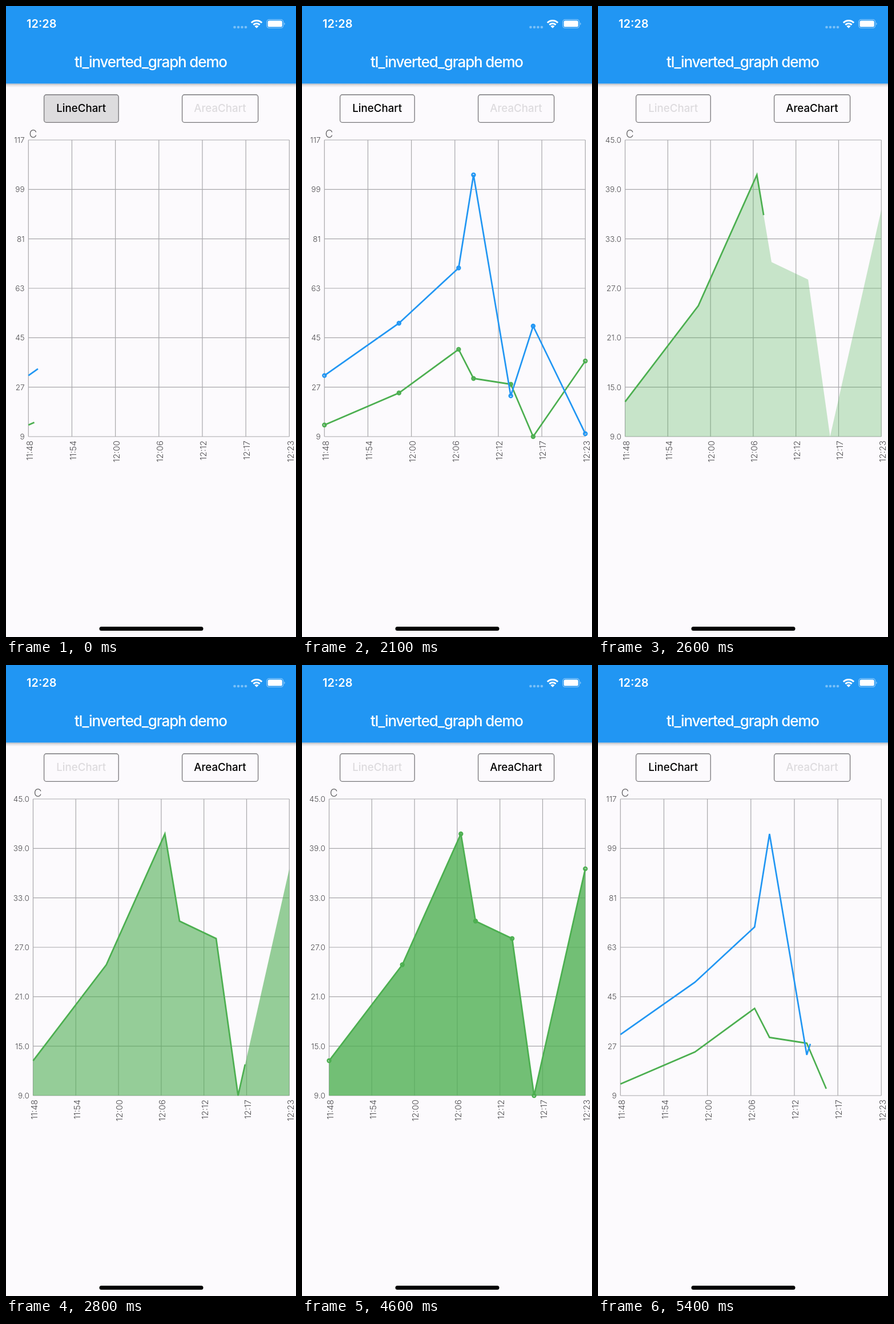
An HTML page for the animation above (5500 ms loop, 508 by 1102 pixels).

```html
<!DOCTYPE html>
<html lang="en">
<head>
<meta charset="utf-8">
<title>Chart demo</title>
<style>
  html, body { margin: 0; width: 100%; height: 100%; overflow: hidden; background: #fcfafd; }
  svg { display: block; width: 100%; height: 100%; font-family: Inter, Roboto, sans-serif; }
  .title { font-size: 26px; font-weight: 500; letter-spacing: -1.15px; fill: #fff; text-anchor: middle; }
  .clock { font-size: 20px; font-weight: 600; fill: #fff; }
  .button rect { stroke: #777679; stroke-width: 1.3; fill: #000; }
  .button text { font-size: 18.7px; font-weight: 500; text-anchor: middle; }
  .grid { fill: none; stroke: #77767a; stroke-opacity: .62; stroke-width: 1.2; }
  .axis { font-weight: 300; fill: #4c4b4e; text-anchor: end; }
  .unit { font-size: 19px; font-weight: 300; fill: #5c5b5e; }
  .line { fill: none; stroke-width: 2.7; stroke-miterlimit: 4; }
  .dots { fill: none; stroke-width: 2.6; }
</style>
</head>
<body>
<svg id="stage" viewBox="0 0 508 1102">
  <defs>
    <linearGradient id="shade" x2="0" y2="1">
      <stop offset="0" stop-opacity=".26"/>
      <stop offset=".45" stop-opacity=".09"/>
      <stop offset="1" stop-opacity="0"/>
    </linearGradient>
  </defs>
  <rect width="508" height="1102" fill="#fcfafd"/>
  <rect y="135.5" width="508" height="7" fill="url(#shade)"/>
  <rect width="508" height="135.5" fill="#2196f3"/>
  <text class="clock" x="36" y="38.3">12:28</text>
  <g fill="#fff" fill-opacity=".4">
    <circle cx="400.5" cy="37" r="2.3"/><circle cx="407" cy="37" r="2.3"/>
    <circle cx="413.5" cy="37" r="2.3"/><circle cx="420" cy="37" r="2.3"/>
  </g>
  <g fill="none" stroke="#fff" stroke-width="3">
    <path d="M429.8 29.2A13 13 0 0 1 448.2 29.2"/>
    <path d="M433.4 32.9A7.9 7.9 0 0 1 444.6 32.9"/>
  </g>
  <path d="M435.4 35.2A5 5 0 0 1 442.6 35.2L439 38.8Z" fill="#fff"/>
  <rect x="456.7" y="23.7" width="29" height="14.8" rx="4.4" fill="none" stroke="#fff" stroke-opacity=".45" stroke-width="1.2"/>
  <rect x="458.6" y="25.6" width="25.2" height="11" rx="2.7" fill="#fff"/>
  <path d="M487.2 28.7Q490.2 31.1 487.2 33.5Z" fill="#fff" fill-opacity=".5"/>
  <text class="title" x="253.5" y="107">tl_inverted_graph demo</text>
  <g id="content"></g>
  <rect x="163.5" y="1084" width="182" height="7" rx="3.5"/>
</svg>
<script>
const GREEN = '#4caf50', BLUE = '#2196f3';
const TOP = 234, BOTTOM = 752, RIGHT = 496.3;
const TIMES = ['11:48', '11:54', '12:00', '12:06', '12:12', '12:17', '12:23'];
const MINUTES = [0, 10, 18, 20, 25, 28, 35];
const GREEN_DATA = [4, 15, 30, 20, 18, 0, 26];
const BLUE_DATA = [21, 39, 58, 90, 14, 38, 1];
const FILL = 0.78, STEP = 100, LOOP = 5500;

function add(parent, tag, attrs = {}, text = '') {
  const el = document.createElementNS('http://www.w3.org/2000/svg', tag);
  for (const key in attrs) el.setAttribute(key, attrs[key]);
  el.textContent = text;
  parent.appendChild(el);
  return el;
}

const content = document.getElementById('content');

function makeButton(x, width, label) {
  const g = add(content, 'g', { class: 'button' });
  return {
    box: add(g, 'rect', { x, y: 155, width, height: 48.3, rx: 4 }),
    label: add(g, 'text', { x: x + width / 2 - 0.2, y: 185.4 }, label),
  };
}

function makeChart({ left, max, labels, series, filled }) {
  const root = add(content, 'g');
  const width = RIGHT - left, height = BOTTOM - TOP;
  let grid = '';
  for (let i = 0; i <= 6; i++) {
    const x = left + width * i / 6, y = BOTTOM - height * i / 6;
    grid += `M${x} ${TOP}V${BOTTOM}M${left} ${y}H${RIGHT}`;
    add(root, 'text', { class: 'axis', x: left - 6.7, y: y + 5, 'font-size': 13.6 }, labels[i]);
    add(root, 'text', { class: 'axis', 'font-size': 15, transform: `translate(${x + 7.2} 759) rotate(-90)` }, TIMES[i]);
  }
  add(root, 'path', { class: 'grid', d: grid });
  add(root, 'text', { class: 'unit', x: left + 1.2, y: 229.6 }, 'C');

  const lines = [], dots = [];
  let area;
  for (const { data, color } of series) {
    const points = data.map((v, i) => [left + width * MINUTES[i] / 35, BOTTOM - height * v / max]);
    const d = 'M' + points.join('L');
    if (filled) area = add(root, 'path', { d: `${d}V${BOTTOM}H${left}Z`, fill: color });
    lines.push(add(root, 'path', { class: 'line', d, stroke: color, pathLength: 1 }));
    const group = add(root, 'g', { class: 'dots', stroke: color });
    for (const [cx, cy] of points) add(group, 'circle', { cx, cy, r: 2.9 });
    dots.push(group);
  }

  return {
    show(visible) { root.style.display = visible ? '' : 'none'; },
    draw(p) {
      for (const line of lines) line.style.strokeDasharray = p < 1 ? `${p} 2` : 'none';
      for (const group of dots) group.style.display = p < 1 ? 'none' : '';
      if (area) area.style.fillOpacity = FILL * p;
    },
  };
}

const buttons = [makeButton(66.6, 130.6, 'LineChart'), makeButton(308.6, 133, 'AreaChart')];
const charts = [
  makeChart({
    left: 39.3, max: 102, labels: [9, 27, 45, 63, 81, 99, 117],
    series: [{ data: GREEN_DATA, color: GREEN }, { data: BLUE_DATA, color: BLUE }],
  }),
  makeChart({
    left: 47.5, max: 34, filled: true,
    labels: ['9.0', '15.0', '21.0', '27.0', '33.0', '39.0', '45.0'],
    series: [{ data: GREEN_DATA, color: GREEN }],
  }),
];

// t advances by dt on each step, then holds; glow is the press highlight per step
const PHASES = [
  { at: 0, chart: 0, t: 0.1, dt: 0.1468, steps: 6, press: 0, glow: [1, 0.7, 0.3] },
  { at: 2100, chart: 0, t: 1, dt: 0, steps: 0, press: 1, glow: [0, 0.8] },
  { at: 2300, chart: 1, t: 0.16, dt: 0.1353, steps: 6, press: 1, glow: [1, 0.6, 0.25] },
  { at: 4600, chart: 1, t: 1, dt: 0, steps: 0, press: 0, glow: [0, 0.4, 0.8, 1] },
  { at: 5000, chart: 0, t: -0.058, dt: 0.222, steps: 4, press: 0, glow: [0.5] },
];

// cubic-bezier(.42, 0, 1, 1)
function easeIn(t) {
  if (t <= 0) return 0;
  if (t >= 1) return 1;
  let lo = 0, hi = 1;
  for (let i = 0; i < 24; i++) {
    const s = (lo + hi) / 2, r = 1 - s;
    if (1.26 * s * r * r + 3 * s * s * r + s * s * s < t) lo = s; else hi = s;
  }
  return lo * lo * (3 - 2 * lo);
}

function render(time) {
  const phase = PHASES.findLast(p => p.at <= time);
  const n = Math.floor((time - phase.at) / STEP);
  const progress = easeIn(phase.t + phase.dt * Math.min(n, phase.steps));
  charts.forEach((chart, i) => chart.show(i === phase.chart));
  charts[phase.chart].draw(progress);
  buttons.forEach(({ box, label }, i) => {
    const glow = i === phase.press ? phase.glow[n] || 0 : 0;
    box.style.fillOpacity = 0.12 * glow;
    label.style.fill = i === phase.chart ? '#000' : '#dddbde';
  });
}

const start = performance.now();
function tick() {
  render((performance.now() - start) % LOOP);
  requestAnimationFrame(tick);
}
tick();
</script>
</body>
</html>
```
